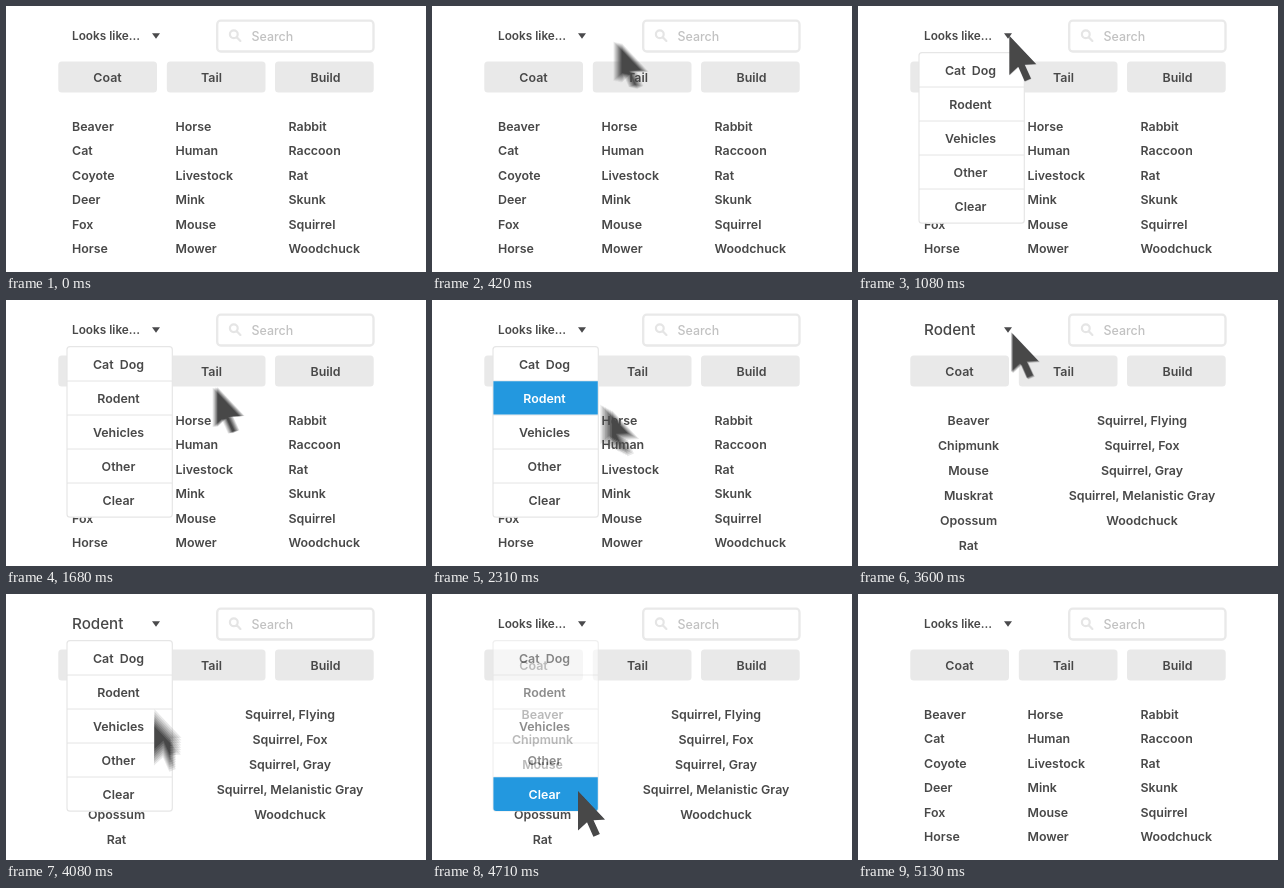
Write an HTML page that moves like this. It is 420x266 px and loops after 6300 ms.

```html
<!DOCTYPE html>
<html lang="en">
<head>
<meta charset="utf-8">
<title>Animal filter menu</title>
<style>
html, body { margin: 0; width: 100%; height: 100%; overflow: hidden; background: #fff; }
svg { display: block; width: 420px; height: 266px; }
text { font: 600 12.4px Inter, "Open Sans", sans-serif; fill: #484848; white-space: pre; }
.mid { text-anchor: middle; }
#cursor { isolation: isolate; }
#cursor path { fill: #434345; mix-blend-mode: plus-lighter; }
</style>
</head>
<body>
<svg id="stage" viewBox="0 0 420 266"></svg>
<script>
const LOOP = 6300, STEP = 30, SHUTTER = 18, BLUR_COPIES = 8;
const stage = document.getElementById("stage");

function add(parent, tag, attrs = {}, content = "") {
  const node = document.createElementNS("http://www.w3.org/2000/svg", tag);
  for (const key in attrs) node.setAttribute(key, attrs[key]);
  node.textContent = content;
  parent.append(node);
  return node;
}
const label = (parent, str, x, y, attrs = {}) => add(parent, "text", { x, y, ...attrs }, str);
const centred = (parent, str, x, y, attrs = {}) => label(parent, str, x, y, { class: "mid", ...attrs });
const show = (node, visible) => node.setAttribute("visibility", visible ? "visible" : "hidden");
const clamp = v => Math.min(1, Math.max(0, v));
const ramp = (t, from, to) => clamp((t - from) / (to - from));

// Toolbar
const placeholder = label(stage, "Looks like…", 66, 34.3, { style: "font-size:11.8px" });
const chosen = label(stage, "Rodent", 66, 35, { style: "font-size:15.2px;font-weight:500" });
add(stage, "path", { d: "M146 27.2h8l-4 5.6z", fill: "#4a4a4c" });
add(stage, "rect", { x: 211.2, y: 14.7, width: 156.3, height: 30.8, rx: 3.5, fill: "#fff", stroke: "#e9e9e9", "stroke-width": 2.3 });
add(stage, "path", {
  d: "M231.7 28.2a3.9 3.9 0 1 1-7.8 0a3.9 3.9 0 1 1 7.8 0M230.8 31.2l3.6 3.7",
  fill: "none", stroke: "#e5e5e5", "stroke-width": 2.2, "stroke-linecap": "round"
});
label(stage, "Search", 245.5, 34.5, { style: "font-weight:500;fill:#c2c2c2" });
[["Coat", 52.3, 101.5], ["Tail", 160.8, 205.5], ["Build", 269, 319.5]].forEach(([name, x, cx]) => {
  add(stage, "rect", { x, y: 55.4, width: 98.7, height: 31, rx: 3.5, fill: "#e9e9e9" });
  centred(stage, name, cx, 76);
});

// Result lists
const allAnimals = add(stage, "g");
const rodents = add(stage, "g");
function column(parent, names, x, pitch, draw) {
  names.split("|").forEach((name, i) => draw(parent, name, x, 124.6 + i * pitch));
}
column(allAnimals, "Beaver|Cat|Coyote|Deer|Fox|Horse", 66, 24.55, label);
column(allAnimals, "Horse|Human|Livestock|Mink|Mouse|Mower", 169.5, 24.55, label);
column(allAnimals, "Rabbit|Raccoon|Rat|Skunk|Squirrel|Woodchuck", 282.5, 24.55, label);
column(rodents, "Beaver|Chipmunk|Mouse|Muskrat|Opossum|Rat", 110.5, 25, centred);
column(rodents, "Squirrel, Flying|Squirrel, Fox|Squirrel, Gray|Squirrel, Melanistic Gray|Woodchuck", 284, 25, centred);

// Dropdown
const ROW = 34, MENU_TOP = 46.6;
const menu = add(stage, "g");
add(menu, "rect", { x: 61, y: MENU_TOP, width: 105.3, height: 170.6, rx: 3, fill: "#fff", stroke: "#e6e6e6", "stroke-width": 1.2 });
const items = ["Cat  Dog", "Rodent", "Vehicles", "Other", "Clear"];
const itemBaseline = row => 68.7 + row * ROW;
items.forEach((name, i) => {
  if (i) add(menu, "path", { d: `M61 ${47 + i * ROW}h105`, stroke: "#e4e4e4" });
  centred(menu, name, 112.5, itemBaseline(i));
});
function highlight(row, shape) {
  const group = add(stage, "g");
  add(group, "path", { d: shape, fill: "#2398df" });
  centred(group, items[row], 112.5, itemBaseline(row), { style: "fill:#fff" });
  return group;
}
const rodentRow = highlight(1, "M61.4 81.2h104.4v33.4H61.4z");
const clearRow = highlight(4, "M61.4 183.2h104.4v31q0 2.7-2.7 2.7h-99q-2.7 0-2.7-2.7z");

// Pointer
const pointer = add(stage, "g", { id: "cursor" });
const copies = Array.from({ length: BLUR_COPIES }, () =>
  add(pointer, "path", { d: "M0 0V39.5L9 31.2L15.4 45.8L21.8 43L15.5 29.2L27 28.6z" }));

// Cubic bezier easing with control points (.5, 0) and (.3, 1)
function ease(p) {
  let lo = 0, hi = 1;
  for (let i = 0; i < 20; i++) {
    const s = (lo + hi) / 2, r = 1 - s;
    const x = 1.5 * r * r * s + 0.9 * r * s * s + s * s * s;
    if (x < p) lo = s; else hi = s;
  }
  return lo * lo * (3 - 2 * lo);
}

// Each move: start time, end time, destination
const ORIGIN = [421, 84];
const moves = [
  [60, 630, 150.9, 29.3],
  [1070, 1380, 219, 86.5],
  [1600, 1950, 148, 94],
  [2220, 2640, 378.2, 212.3],
  [3262, 3660, 151, 30.5],
  [3900, 4320, 146, 197],
  [4715, 5140, 200, 276]
];
function pointerAt(t) {
  let [x, y] = ORIGIN;
  for (const [from, to, tx, ty] of moves) {
    if (t <= from) break;
    const k = ease(ramp(t, from, to));
    x += (tx - x) * k;
    y += (ty - y) * k;
  }
  return [x, y];
}

function drawPointer(t) {
  const moving = moves.some(([from, to]) => t + SHUTTER > from && t < to);
  copies.forEach((copy, i) => {
    const [x, y] = pointerAt(t + (moving ? SHUTTER * i / (BLUR_COPIES - 1) : 0));
    copy.setAttribute("transform", `translate(${x} ${y})`);
    copy.setAttribute("opacity", moving ? 1 / BLUR_COPIES : 1);
    show(copy, moving || i === 0);
  });
}

const FIRST = { open: 840, click: 2160, fade: 2320, done: 2480 };
const SECOND = { open: 3780, click: 4560, fade: 4650, done: 4810 };
const menuOpacity = (t, m) => ramp(t, m.open, m.open + 60) * (1 - ramp(t, m.fade, m.done));
const within = (t, from, to) => t >= from && t < to;

function render(t) {
  const picked = within(t, FIRST.fade, SECOND.fade);
  show(chosen, picked);
  show(placeholder, !picked);
  const filtered = within(t, FIRST.done, SECOND.done);
  show(rodents, filtered);
  show(allAnimals, !filtered);
  menu.setAttribute("opacity", menuOpacity(t, FIRST) + menuOpacity(t, SECOND));
  show(rodentRow, within(t, FIRST.click, FIRST.done));
  show(clearRow, within(t, SECOND.click, SECOND.done));
  drawPointer(t);
}

const start = performance.now();
function tick() {
  const t = (performance.now() - start) % LOOP;
  render(Math.floor(t / STEP) * STEP);
  requestAnimationFrame(tick);
}
tick();
</script>
</body>
</html>
```
